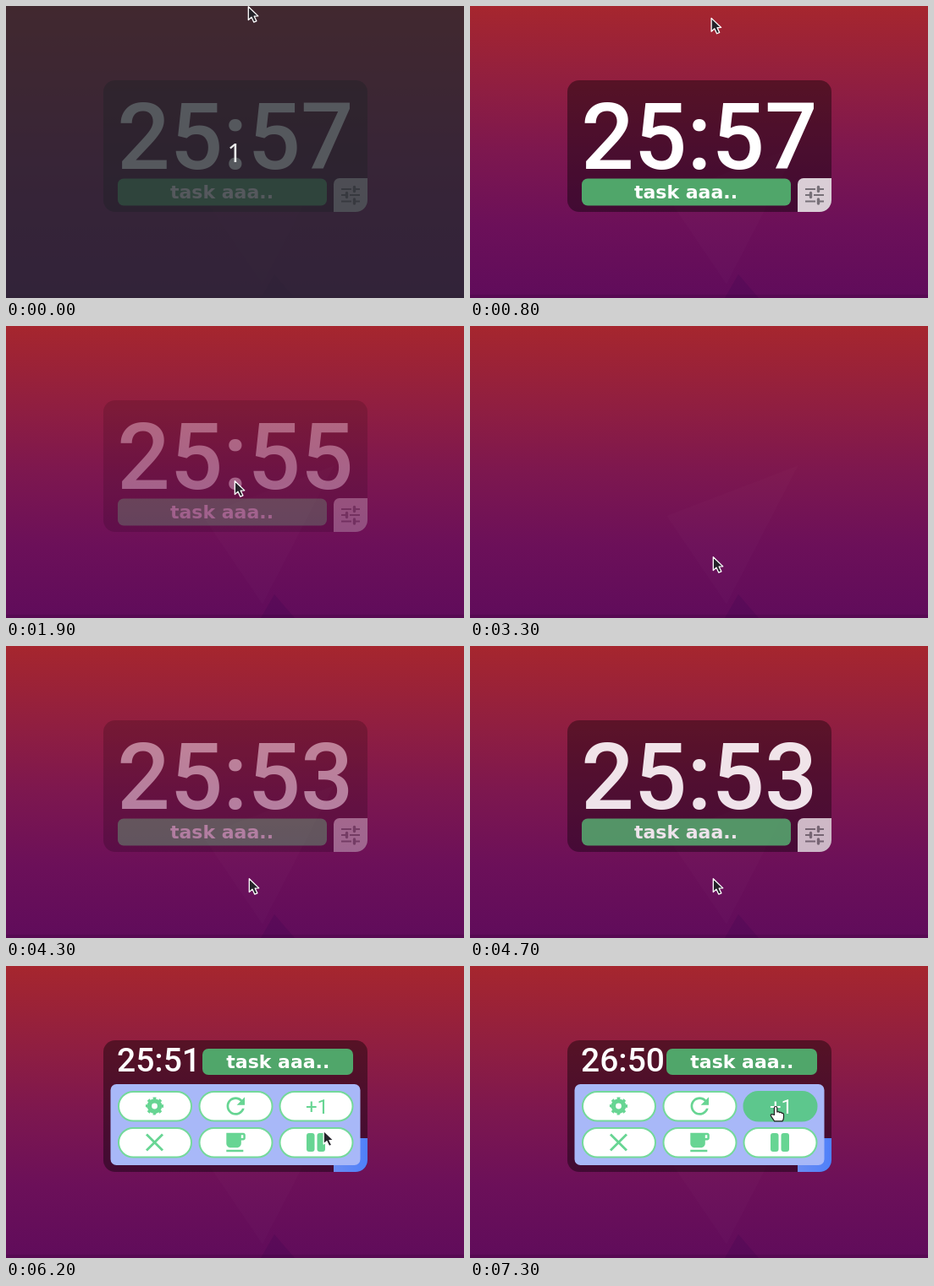
Write an HTML page that moves like this. It is 541x346 px and loops after 8 s.

```html
<!DOCTYPE html>
<html lang="en">
<head>
<meta charset="utf-8">
<title>Task timer</title>
<style>
html, body { margin: 0; width: 100%; height: 100%; overflow: hidden; background: #5f0c5b; }
svg { display: block; width: 541px; height: 346px; }
.num { font-family: Roboto, sans-serif; font-weight: 500; fill: #fff; text-anchor: middle; }
.task { font: bold 22px "DejaVu Sans", sans-serif; fill: #fff; text-anchor: middle; }
.bar { fill: #50a66a; }
.pill { fill: #fff; stroke: #74d99b; stroke-width: 2; }
.icon { fill: #67d593; }
.line { fill: none; stroke: #67d593; }
</style>
</head>
<body>
<svg viewBox="0 0 541 346">
  <defs>
    <linearGradient id="sky" x1="0" y1="0" x2="0" y2="1">
      <stop offset="0" stop-color="#a6262e"/>
      <stop offset=".25" stop-color="#921f3f"/>
      <stop offset=".5" stop-color="#7d174f"/>
      <stop offset=".75" stop-color="#6c1059"/>
      <stop offset="1" stop-color="#600c5b"/>
    </linearGradient>
    <linearGradient id="blue" x1="0" y1="0" x2="1" y2="0">
      <stop offset="0" stop-color="#6a8df2"/>
      <stop offset="1" stop-color="#4f80fa"/>
    </linearGradient>
    <path id="corner" d="M387 244V211a7 7 0 0 1 7-7H427V230a14 14 0 0 1-14 14Z"/>
  </defs>

  <rect width="541" height="346" fill="url(#sky)"/>
  <path d="M388 165L303 330L232 225Z" fill="#fff" opacity=".012"/>
  <path d="M317 318L341 346H301Z" fill="#30004a" opacity=".16"/>
  <rect y="342" width="541" height="4" fill="#300030" opacity=".18"/>

  <g id="widget">
    <rect x="115" y="88" width="312" height="156" rx="14" fill="#000" fill-opacity=".41"/>
    <g id="big">
      <text class="num clock" x="270.8" y="193" font-size="110"></text>
      <rect class="bar" x="132" y="204.5" width="247" height="32" rx="7"/>
      <text class="task" x="255" y="228">task aaa..</text>
      <use href="#corner" fill="#fff" fill-opacity=".8"/>
      <g fill="none" stroke="#777078" stroke-width="2">
        <path d="M396 217H408M412 217H418M396 224H402M406 224H418M396 231.5H408M412 231.5H418"/>
        <path d="M411.5 214.5V219.5M402.5 221.5V226.5M411.5 229V234" stroke-width="3.4" stroke-linecap="round"/>
      </g>
    </g>
    <g id="menu">
      <text class="num clock" x="180.5" y="124.8" font-size="39"></text>
      <rect class="bar" x="232" y="98" width="178" height="31" rx="7"/>
      <text class="task" x="321.3" y="121">task aaa..</text>
      <use href="#corner" fill="url(#blue)"/>
      <rect x="123.5" y="140" width="295" height="96" rx="7" fill="#a8b8f8"/>
      <g id="pills"></g>
      <g transform="translate(175.5 166)">
        <circle class="line" r="6.1" stroke-width="5.4"/>
        <circle class="line" r="9.2" stroke-width="2.8" pathLength="16" stroke-dasharray="1 1" transform="rotate(-11.25)"/>
      </g>
      <path class="icon" transform="translate(255.2 150) scale(1.34)" d="M17.65 6.35C16.2 4.9 14.21 4 12 4c-4.42 0-7.99 3.58-7.99 8s3.57 8 7.99 8c3.73 0 6.84-2.55 7.73-6h-2.08c-.82 2.33-3.04 4-5.65 4-3.31 0-6-2.69-6-6s2.69-6 6-6c1.66 0 3.14.69 4.22 1.78L13 11h7V4z"/>
      <text id="plus" x="367.5" y="175" font-family="Roboto, sans-serif" font-size="24" text-anchor="middle">+1</text>
      <path class="line" stroke-width="2.8" d="M166 199.5L185 218.5M185 199.5L166 218.5"/>
      <path class="icon" transform="translate(255.3 194) scale(1.25)" fill-rule="evenodd" d="M20 3H4v10c0 2.21 1.79 4 4 4h6c2.21 0 4-1.79 4-4v-3h2c1.11 0 2-.9 2-2V5c0-1.11-.89-2-2-2zm0 5h-2V5h2zM4 19h16v2H4z"/>
      <rect class="icon" x="355" y="198" width="9.5" height="22" rx="3"/>
      <rect class="icon" x="367.5" y="198" width="9.5" height="22" rx="3"/>
    </g>
  </g>

  <g id="shade">
    <rect width="541" height="346" fill="#262a30" opacity=".78"/>
    <text x="270" y="185" font-family="'Noto Sans', sans-serif" font-size="30" fill="#ececec" text-anchor="middle">1</text>
  </g>

  <g id="cursor">
    <path id="arrow" d="M.3 .8V16.6L4 13.3L6.8 19.2L9.9 17.8L7.2 12.2L11.8 11.9Z" fill="#25232a" stroke="#fff" stroke-width="1.3" stroke-linejoin="round"/>
    <path id="hand" d="M-1.6 9.5V1.2a1.7 1.7 0 0 1 3.4 0V6q2-.8 2.9.6q2-.5 2.8.8q2-.2 2 1.8V12.5q0 2.2-1.5 4.3H-1.4Q-3.4 14-5.6 10.6q-.6-2 1.4-2z" fill="#fff" stroke="#222" stroke-width="1.2" stroke-linejoin="round"/>
  </g>
</svg>
<script>
const LOOP = 8000, STEP = 100;
const $ = id => document.getElementById(id);
const clocks = document.querySelectorAll(".clock");
const clamp = v => Math.max(0, Math.min(1, v));
const show = (id, on) => $(id).setAttribute("display", on ? "inline" : "none");

// time, x, y of the pointer tip
const path = [
  [700, 286, 0], [1300, 270, 183], [2700, 270, 183], [3300, 287, 273],
  [4000, 287, 273], [4200, 287, 275], [4900, 287, 275], [5300, 373, 273],
  [5400, 373, 273], [5500, 392.5, 266.5], [5600, 392.5, 266.5], [5700, 417, 241],
  [5800, 417, 241], [6300, 370, 189], [6400, 370, 189], [6500, 362, 171], [6600, 361, 167]
];

function pointer(t) {
  const i = path.findIndex(k => k[0] > t);
  if (i < 0) return path[path.length - 1].slice(1);
  if (i === 0) return path[0].slice(1);
  const a = path[i - 1], b = path[i];
  const u = (t - a[0]) / (b[0] - a[0]), e = u * u * (3 - 2 * u);
  return [1, 2].map(n => a[n] + (b[n] - a[n]) * e);
}

// one tick per second at .9 s; the +1 button adds a minute
function clock(t) {
  const s = 25 * 60 + 57 - Math.floor((t + 100) / 1000) + (t >= 7300 ? 60 : 0);
  return Math.floor(s / 60) + ":" + String(s % 60).padStart(2, "0");
}

const opacity = t => t < 3000 ? clamp(1 - (t - 1280) / 920) : clamp((t - 3890) / 920);

const pills = [];
for (const y of [149, 192]) for (const x of [133, 228.5, 323.5]) {
  const r = document.createElementNS("http://www.w3.org/2000/svg", "rect");
  const box = { class: "pill", x, y, width: 86, height: 34.5, rx: 17.25 };
  for (const k in box) r.setAttribute(k, box[k]);
  $("pills").append(r);
  pills.push(r);
}

function draw(t) {
  const open = t >= 5700, hover = t >= 6500;
  const text = clock(t);
  clocks.forEach(c => { c.textContent = text; });
  $("widget").setAttribute("opacity", opacity(t));
  show("shade", t < 500);
  show("big", !open);
  show("menu", open);

  const tint = t >= 7100 ? "#5dc78d" : "#69d695";
  pills[2].style.fill = hover ? tint : "#fff";
  pills[2].style.stroke = hover ? tint : "#74d99b";
  $("plus").setAttribute("fill", hover ? "#fff" : "#67d593");

  show("arrow", !hover);
  show("hand", hover);
  $("cursor").setAttribute("transform", `translate(${pointer(t).join(" ")})`);
}

function frame() {
  draw(Math.floor(performance.now() % LOOP / STEP) * STEP);
  requestAnimationFrame(frame);
}
frame();
</script>
</body>
</html>
```
